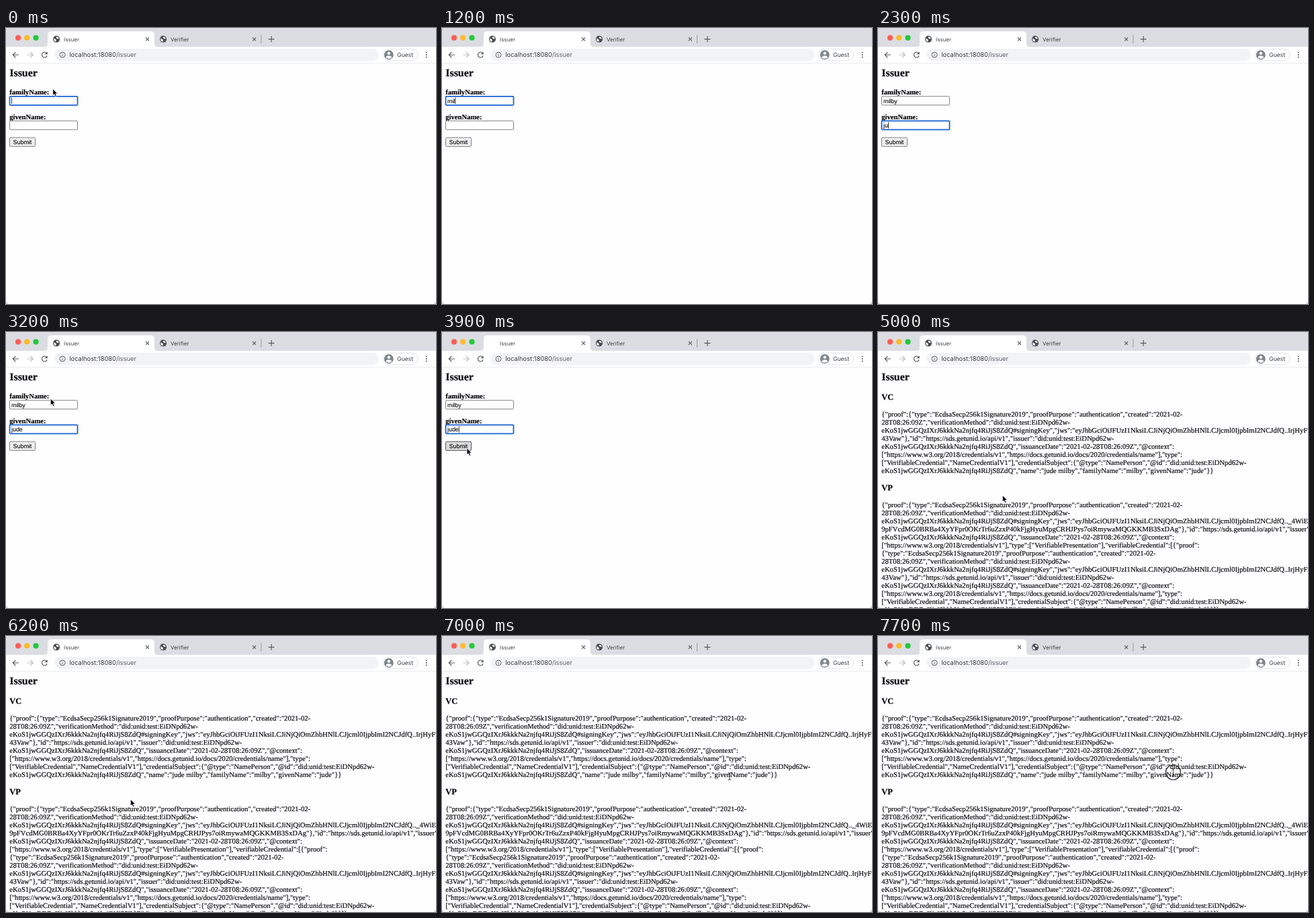
Write an HTML page that moves like this. It is 640 by 411 pixels and loops after 8 s.

```html
<!DOCTYPE html>
<html lang="en">
<head>
<meta charset="utf-8">
<title>Issuer</title>
<style>
  html, body { margin: 0; width: 100%; height: 100%; overflow: hidden; background: #d4d4d6; }
  svg { display: block; width: 100vw; height: 100vh; }
  text { white-space: pre; text-rendering: geometricPrecision; font-variant-ligatures: none; }
  .ui { font-family: Inter, Roboto, sans-serif; fill: #3c4043; }
  .serif { font-family: "Liberation Serif", "Noto Serif", serif; font-size: 10.667px; fill: #000; stroke: #000; stroke-width: .15; }
  .bold { font-weight: 700; }
  .control { font-family: "Liberation Sans", sans-serif; font-size: 8.89px; fill: #000; stroke: #000; stroke-width: .1; }
  .line { fill: none; stroke: #55595d; stroke-width: 1.15; }
</style>
</head>
<body>
<svg id="stage" viewBox="0 0 640 411" preserveAspectRatio="none">
  <defs>
    <g id="globe">
      <circle r="5" fill="#474a4e"/>
      <path d="M-3.9-1.2C-2.5-.8-1.3-.2-.5.8C.1 1.7-.6 2.3-.7 3.9C-2.8 3.5-4.2 1.6-3.9-1.2Z M.2-3.9C2-3.6 3.2-2.5 3.8-1C2.9-.1 2.2-.3 1.3-.8C.4-1-.4-1.4-.5-2.1C.3-2.4.5-3 .2-3.9Z" fill="#fff"/>
    </g>
    <path id="cross" class="line" d="M-2.5-2.5L2.5 2.5M2.5-2.5L-2.5 2.5"/>
  </defs>
  <clipPath id="window"><rect width="640" height="411" rx="5.5"/></clipPath>
  <g clip-path="url(#window)">
    <rect width="640" height="411" fill="#fefdff"/>
    <g id="form"></g>
    <g id="result"></g>

    <rect width="640" height="29" fill="#dbdde2"/>
    <rect y="28" width="640" height="24" fill="#fff"/>
    <path d="M0 52.3H640" stroke="#e3e4e6" stroke-width=".7"/>
    <circle cx="18" cy="14.7" r="4.1" fill="#fe5f57"/>
    <circle cx="31.2" cy="14.7" r="4.1" fill="#febc2e"/>
    <circle cx="44.5" cy="14.7" r="4.1" fill="#28c840"/>
    <path d="M56.500 28.500Q62 28.500 62 23V10.500Q62 5 67.500 5H215.500Q221 5 221 10.500V23Q221 28.500 226.500 28.500Z" fill="#fff"/>
    <use id="favicon" href="#globe" x="75" y="16.600"/>
    <circle id="throbber" cx="74.500" cy="12.500" r=".7" fill="#777b80"/>
    <text class="ui" x="86" y="19.700" font-size="8">Issuer</text>
    <use href="#cross" x="210.500" y="16.600"/>
    <use href="#globe" x="234" y="16.600"/>
    <text class="ui" x="245" y="19.700" font-size="8">Verifier</text>
    <use href="#cross" x="369.500" y="16.600"/>
    <path d="M379.700 10.500V23" stroke="#85898e" stroke-width=".8"/>
    <path class="line" d="M390.500 16.600H399.500M395 12.100V21.100"/>

    <path class="line" d="M19 40H10.500M14.300 36L10.300 40L14.300 44"/>
    <path class="line" d="M31.500 40H40M36.200 36L40.200 40L36.200 44" style="stroke:#bcbec1"/>
    <g id="reload">
      <path class="line" d="M60.300 37.200A4 4 0 1 0 61.200 41.300"/>
      <path d="M61.700 35.300V39.300H57.700Z" fill="#55595d"/>
    </g>
    <path id="stop" class="line" d="M53.500 36.200L61 43.700M61 36.200L53.500 43.700"/>
    <rect x="72" y="31" width="483" height="18" rx="9" fill="#f1f3f4"/>
    <circle class="line" cx="84" cy="40" r="4" style="stroke-width:.9"/>
    <path d="M84 39.400V42.300M84 37.500V38.500" stroke="#55595d"/>
    <text class="ui" x="94.300" y="43.300" font-size="9.333">localhost:18080<tspan fill="#5f6368">/issuer</tspan></text>
    <rect x="560.500" y="31.300" width="52.500" height="17.400" rx="8.700" fill="#fff" stroke="#dadce0" stroke-width=".8"/>
    <circle cx="569.700" cy="40" r="7" fill="#80868b"/>
    <circle cx="569.700" cy="37.600" r="2.200" fill="#fff"/>
    <path d="M565.200 43.900Q566 41.300 569.700 41.300T574.200 43.900Q572.500 45.500 569.700 45.500T565.200 43.900Z" fill="#fff"/>
    <text class="ui" x="582" y="43.100" font-size="8.667">Guest</text>
    <g fill="#55595d"><circle cx="625.700" cy="36.600" r="1"/><circle cx="625.700" cy="40" r="1"/><circle cx="625.700" cy="43.400" r="1"/></g>

    <g id="pointer">
      <path id="arrow" d="M0 0V10.200L2.300 8.100L3.900 11.700L5.700 10.900L4.100 7.400H7.200Z" fill="#000" stroke="#fff" stroke-width=".8"/>
      <path id="beam" d="M-2-5.500Q0-5.500 0-4V4Q0 5.500-2 5.500M2-5.500Q0-5.500 0-4M0 4Q0 5.500 2 5.500" fill="none" stroke="#222" stroke-width=".9"/>
      <circle id="press" r="11" fill="none" stroke="#222" stroke-width="1.200"/>
    </g>
  </g>
</svg>
<script>
const $ = id => document.getElementById(id);
const LOOP = 8000, STEP = 100, LOADED = 5000;
const FAMILY = 'milby', GIVEN = 'jude';
const FAMILY_KEYS = [1000, 1100, 1200, 1300, 1500];
const GIVEN_KEYS = [2100, 2300, 2400, 2600];
const TAB_KEY = 1900, HOVER = 3600, BLUR = 4200;

function add(parent, tag, attrs, content = '') {
  const node = document.createElementNS('http://www.w3.org/2000/svg', tag);
  for (const name in attrs) node.setAttribute(name, attrs[name]);
  node.textContent = content;
  return parent.appendChild(node);
}
const show = (node, on) => node.setAttribute('visibility', on ? 'visible' : 'hidden');
const heading = (parent, y, size, label) =>
  add(parent, 'text', { class: 'serif bold', x: 5.2, y, style: `font-size:${size}px` }, label);

function makeField(label, y) {
  const form = $('form');
  heading(form, y - 2.5, 10.667, label);
  return {
    y,
    box: add(form, 'rect', { x: 5.5, y: y + .3, width: 101, height: 13, rx: 1.2, fill: '#fff' }),
    text: add(form, 'text', { class: 'control', x: 8, y: y + 10 })
  };
}

heading($('form'), 72.1, 16, 'Issuer');
const family = makeField('familyName:', 101.5);
const given = makeField('givenName:', 138);
const button = add($('form'), 'rect', { x: 5.5, y: 163.2, width: 38, height: 13.2, rx: 1.5, 'stroke-width': .9 });
add($('form'), 'text', { class: 'control', x: 10.6, y: 172.9 }, 'Submit');
const caret = add($('form'), 'rect', { width: .8, height: 9.4, fill: '#000' });

// Page shown after submitting
const key = 'eKoS1jwGGQzIXrJ6kkkNa2njfq4RiJjS8ZdQ';
const did = 'did:unid:test:EiDNpd62w-';
const api = '"},"id":"https://sds.getunid.io/api/v1","issuer":"' + did;
const signed = key + '#signingKey","jws":"eyJhbGciOiJFUzI1NksiLCJiNjQiOmZhbHNlLCJjcml0IjpbImI2NCJdfQ..';
const proof = '{"type":"EcdsaSecp256k1Signature2019","proofPurpose":"authentication","created":"2021-02-';
const method = '28T08:26:09Z","verificationMethod":"' + did;
const issued = key + '","issuanceDate":"2021-02-28T08:26:09Z","@context":';
const credential = [
  method,
  signed + 'IrjHyFx',
  '43Vaw' + api,
  issued,
  '["https://www.w3.org/2018/credentials/v1","https://docs.getunid.io/docs/2020/credentials/name"],"type":',
  '["VerifiableCredential","NameCredentialV1"],"credentialSubject":{"@type":"NamePerson","@id":"' + did,
  `${key}","name":"${GIVEN} ${FAMILY}","familyName":"${FAMILY}","givenName":"${GIVEN}"}}`
];
const presentation = [
  '{"proof":' + proof,
  method,
  signed + '_4WiEz',
  '9pFVcdMG0BRBa4XyYFpr0OKrTr6uZzxP40kFjgHyuMpgCRHJPys7oiRmywaMQGKKMB3SxDAg' + api,
  issued,
  '["https://www.w3.org/2018/credentials/v1"],"type":["VerifiablePresentation"],"verifiableCredential":[{"proof":',
  proof,
  ...credential
];
presentation[presentation.length - 1] += ']}';

function section(title, y, lines) {
  heading($('result'), y, 12.48, title);
  lines.forEach((line, i) => add($('result'), 'text', { class: 'serif', x: 5.2, y: y + 25.6 + i * 12 }, line));
}
heading($('result'), 72.1, 16, 'Issuer');
section('VC', 100.6, ['{"proof":' + proof, ...credential]);
section('VP', 235.6, presentation);

const pointerPath = [
  [0, 69.7, 90.5], [3100, 69.7, 90.5], [3600, 37, 172.7], [4500, 37, 172.7],
  [4900, 160.7, 225], [5000, 185.3, 243], [6300, 185.3, 243],
  [6700, 428, 209], [7000, 428, 209], [7600, 439.3, 203], [LOOP, 439.3, 203]
];

function pointerAt(t) {
  const i = pointerPath.findIndex(stop => stop[0] > t);
  const [t0, x0, y0] = pointerPath[i - 1], [t1, x1, y1] = pointerPath[i];
  const u = (t - t0) / (t1 - t0), eased = u * u * (3 - 2 * u);
  return [x0 + (x1 - x0) * eased, y0 + (y1 - y0) * eased];
}

const typed = (word, keys, t) => word.slice(0, keys.filter(k => k <= t).length);

function setField(field, value, focused) {
  field.text.textContent = value;
  field.box.setAttribute('stroke', focused ? '#1a62d2' : '#767676');
  field.box.setAttribute('stroke-width', focused ? 1.8 : .9);
}

function render(t) {
  const loaded = t >= LOADED, loading = t >= BLUR && !loaded;
  show($('form'), !loaded);
  show($('result'), loaded);

  const focus = t < TAB_KEY ? family : t < BLUR ? given : null;
  setField(family, typed(FAMILY, FAMILY_KEYS, t), focus === family);
  setField(given, typed(GIVEN, GIVEN_KEYS, t), focus === given);
  button.setAttribute('fill', t >= HOVER ? '#dcdcdc' : '#efefef');
  button.setAttribute('stroke', t >= HOVER ? '#444' : '#767676');

  // The caret blink restarts with every key
  const lastKey = Math.max(0, ...[...FAMILY_KEYS, TAB_KEY, ...GIVEN_KEYS].filter(k => k <= t));
  show(caret, focus && (t - lastKey) % 1000 < 500);
  if (focus) {
    const width = focus.text.textContent ? focus.text.getComputedTextLength() : 0;
    caret.setAttribute('x', 8.1 + width);
    caret.setAttribute('y', focus.y + 2.1);
  }

  show($('favicon'), t < 3800 || loaded);
  show($('throbber'), loading);
  show($('reload'), !loading);
  show($('stop'), loading);

  const [x, y] = pointerAt(t);
  const visible = t < FAMILY_KEYS[0] || t >= 3200;
  const overText = t > 6300;
  $('pointer').setAttribute('transform', `translate(${x} ${y})`);
  show($('arrow'), visible && !overText);
  show($('beam'), overText);
  show($('press'), t === 3700 || t >= 7700);
}

function frame(now) {
  render(Math.floor(now % LOOP / STEP) * STEP);
  requestAnimationFrame(frame);
}
render(0);
requestAnimationFrame(frame);
</script>
</body>
</html>
```
